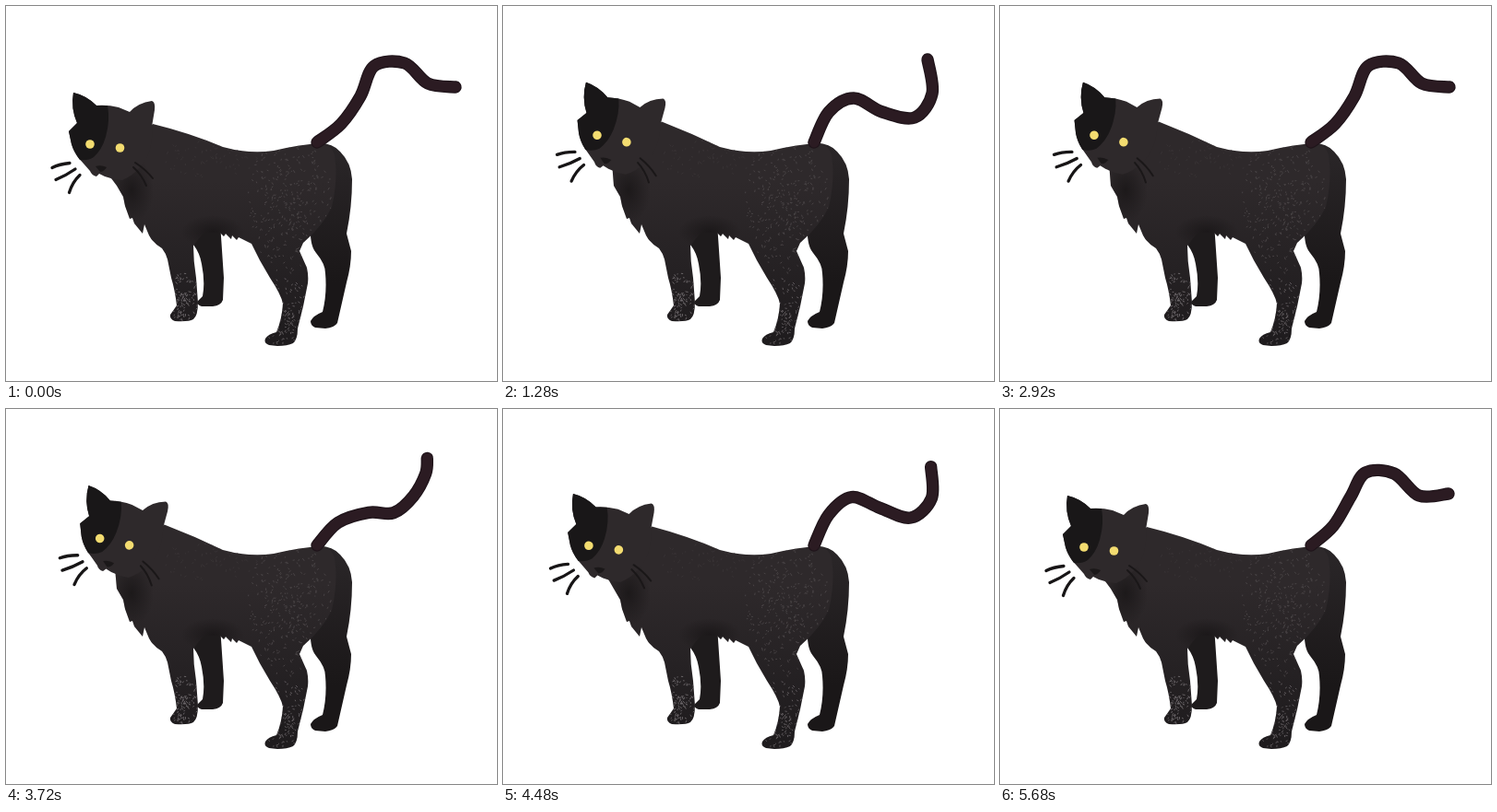
These frames come from a looping animation (532 px wide and 407 px high, 5.76 s). An HTML page:

```html
<!DOCTYPE html>
<html lang="en">
<head>
<meta charset="utf-8">
<title>Black cat</title>
<style>
  html, body { margin: 0; width: 100%; height: 100%; overflow: hidden; background: #fff; }
  svg { display: block; width: 100vw; height: 100vh; }
  .line { fill: none; stroke-linecap: round; stroke-linejoin: round; }
</style>
</head>
<body>
<svg viewBox="0 0 532 407">
  <defs>
    <linearGradient id="coat" gradientUnits="userSpaceOnUse" x1="0" y1="190" x2="0" y2="350">
      <stop offset="0" stop-color="#2e292b"/>
      <stop offset="1" stop-color="#1f1c1e"/>
    </linearGradient>
    <linearGradient id="shade" gradientUnits="userSpaceOnUse" x1="0" y1="165" x2="0" y2="300">
      <stop offset="0" stop-color="#292527"/>
      <stop offset="1" stop-color="#1a1718"/>
    </linearGradient>
    <radialGradient id="soft">
      <stop offset="0" stop-color="#181516" stop-opacity=".8"/>
      <stop offset="1" stop-color="#181516" stop-opacity="0"/>
    </radialGradient>
    <clipPath id="inside"><path id="clip"/></clipPath>
  </defs>

  <!-- far legs -->
  <path fill="url(#shade)" d="M340 149Q354 149 362 158Q374 170 375 188Q375 218 369 247L374 266
    Q374 282 369 300L359 344Q356 349 346 350L335 349Q330 347 330 342Q333 336 343 332
    Q348 312 346 290Q346 280 336 268Q329 260 330 240Z"/>
  <path fill="#1e1b1c" d="M200 235L232 235L236 295L235 319Q233 325 224 326L212 326Q206 324 208 320
    L213 315Q216 300 212 280Q210 268 203 259Z"/>

  <path id="body" fill="url(#coat)"/>
  <g clip-path="url(#inside)">
    <ellipse cx="136" cy="200" rx="24" ry="36" fill="url(#soft)"/>
    <ellipse cx="224" cy="245" rx="34" ry="18" fill="url(#soft)"/>
    <g id="specks" class="line"></g>
  </g>

  <path id="tailEdge" class="line" stroke="#1f141a" stroke-width="13.4"/>
  <path id="tail" class="line" stroke="#2b1b22" stroke-width="11"/>

  <g id="head">
    <path fill="#2e292b" d="M73 94Q87 97 98 108Q110 107 122 110L134 115Q143 105 158 103Q162 104 161 113L158 131
      Q160 158 146 174Q138 184 126 189L117 188L107 185L101 182L98 185Q93 184 91 179L84 171Q75 162 71 150
      L68 136L77 127Q70 111 73 94Z"/>
    <path fill="#191718" d="M73 94Q87 97 98 108L110 108Q113 124 108 142Q104 156 95 164Q89 168 80 167
      Q73 158 71 150L68 136L77 127Q70 111 73 94Z"/>
    <path fill="#1b1819" d="M97 174Q103 172 109 175Q106 180 102 180Z"/>
    <path class="line" stroke="#1a1718" stroke-width="2"
      d="M140 170Q151 177 159 187M138 175Q147 183 152 195"/>
    <path class="line" stroke="#171516" stroke-width="3.3"
      d="M50 175.500Q58 171.500 69 170.500M54 188.500Q65 184 75 177M68.500 202.500Q72 191 80 183.500"/>
    <g fill="#f3dc70">
      <circle cx="91" cy="150" r="4.800"/>
      <circle cx="123.500" cy="154" r="4.800"/>
    </g>
  </g>
</svg>

<script>
const LOOP = 5760, TICK = 40, TAIL_CYCLE = 2920;
const $ = id => document.getElementById(id);
const mix = (a, b, k) => a + (b - a) * k;
const clamp = v => Math.max(0, Math.min(1, v));
const smooth = v => v * v * (3 - 2 * v);

// Key points along the tail at a few of its sixteen steps
const ROOT = [337, 148];
const POSES = [
  { step: 0, pts: [363,128, 384,98, 399,65, 432,62, 457,84, 487,88] },
  { step: 3, pts: [365,128, 405,119, 426,100, 430,68, 446,55, 461,64] },
  { step: 6, pts: [357,121, 387,109, 417,119, 447,108, 459,78, 454,48] },
  { step: 8, pts: [353,115, 380,100, 411,115, 446,121, 465,95, 460,58] },
  { step: 11, pts: [352,115, 373,87, 403,92, 433,112, 463,101, 471,72] },
  { step: 15, pts: [361,127, 380,95, 396,69, 427,70, 454,94, 486,92] }
];

// Steps of 160 ms with a rest after the tenth
function tailStep(t) {
  const p = t % TAIL_CYCLE;
  return p < 2120 ? Math.min(10, Math.floor(p / 160)) : 11 + Math.floor((p - 2120) / 160);
}

function tailPath(step) {
  const i = POSES.findLastIndex(p => p.step <= step);
  const a = POSES[i], b = POSES[(i + 1) % POSES.length];
  const k = (step - a.step) / ((b.step || 16) - a.step);
  const flat = a.pts.map((v, j) => mix(v, b.pts[j], k));
  const pts = [ROOT];
  for (let j = 0; j < flat.length; j += 2) pts.push([flat[j], flat[j + 1]]);
  return curve(pts);
}

// Catmull-Rom spline as cubic segments
function curve(p) {
  let d = "M" + p[0];
  for (let i = 0; i < p.length - 1; i++) {
    const a = p[i - 1] || p[i], b = p[i], c = p[i + 1], e = p[i + 2] || c;
    d += "C" + [b[0] + (c[0] - a[0]) / 6, b[1] + (c[1] - a[1]) / 6,
                c[0] - (e[0] - b[0]) / 6, c[1] - (e[1] - b[1]) / 6, c[0], c[1]];
  }
  return d;
}

// 0 = head low, 1 = head raised
function headLift(t) {
  if (t < 3600) return smooth(clamp((t - 120) / 840) ** 0.8);
  return 1 - smooth(clamp((t - 3600) / 1200));
}

const EYE = [91, 150], SHIFT = [11, -9.7], TILT = 6;

function headPoint(x, y, k) {
  const r = TILT * k * Math.PI / 180, c = Math.cos(r), s = Math.sin(r);
  const dx = x - EYE[0], dy = y - EYE[1];
  return [EYE[0] + SHIFT[0] * k + dx * c - dy * s, EYE[1] + SHIFT[1] * k + dx * s + dy * c];
}

// The neck stretches between the moving head and the still shoulders.
function bodyPath(k) {
  const nape = headPoint(159, 128, k), throat = headPoint(111, 183, k);
  return `M${nape}Q${mix(200, 204, k)} 138 235 153Q264 161 290 157Q320 150 340 149Q352 149 356 162
    Q360 188 353 218Q344 238 322 257L318 266L326 284Q328 293 327 301L322 326L316 350Q316 362 311 366
    Q305 369 294 369L285 368Q279 366 281 361Q284 356 293 354Q299 340 300 323Q298 313 286 295L275 276L266 258
    L252 251L250 254L245 249L244 253L238 247L236 250L232 246L214 246L203 260Q203 277 206 295L208 322
    Q208 336 203 340Q198 343 183 342Q177 340 178 335L185 325Q183 308 179 295L175 275Q173 268 169 263
    Q159 257 155 249L150 237L148 247L139 236L137 230L134 231L129 217L127 207L120 195L${throat}Z`;
}

// Flecks scattered in an ellipse, denser towards its middle
function addSpecks() {
  let seed = 11;
  const rnd = () => (seed = seed * 16807 % 2147483647) / 2147483647;
  const scatter = (cx, cy, rx, ry, count, colour) => {
    let d = "";
    for (let i = 0; i < count; i++) {
      const a = rnd() * 2 * Math.PI, r = rnd() ** 0.7;
      d += `M${cx + Math.cos(a) * r * rx} ${cy + Math.sin(a) * r * ry}l${rnd() * 3 - 1.5} ${rnd() * 3 - 1}`;
    }
    const path = document.createElementNS("http://www.w3.org/2000/svg", "path");
    path.setAttribute("d", d);
    path.setAttribute("stroke", colour);
    $("specks").append(path);
  };
  scatter(225, 165, 55, 22, 80, "#383335");
  scatter(308, 215, 48, 75, 330, "#484345");
  scatter(304, 335, 26, 42, 150, "#5f5a5d");
  scatter(194, 317, 16, 30, 110, "#696467");
}

function setPath(d, ...ids) {
  for (const id of ids) $(id).setAttribute("d", d);
}

function draw(now) {
  const t = Math.floor((now % LOOP) / TICK) * TICK;
  const k = headLift(t);
  setPath(tailPath(tailStep(t)), "tail", "tailEdge");
  setPath(bodyPath(k), "body", "clip");
  $("head").setAttribute("transform",
    `translate(${SHIFT[0] * k} ${SHIFT[1] * k}) rotate(${TILT * k} ${EYE})`);
}

addSpecks();
const start = performance.now();
function loop() {
  draw(performance.now() - start);
  requestAnimationFrame(loop);
}
loop();
</script>
</body>
</html>
```
